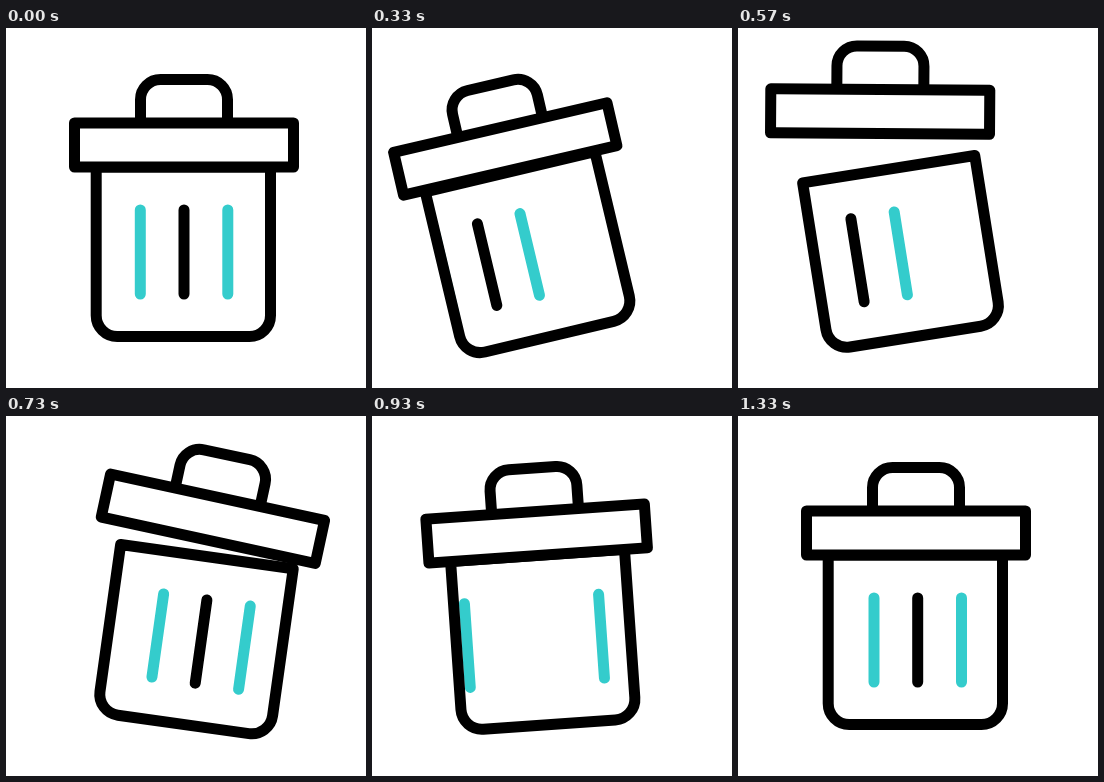
Recreate the animation shown at these times as an HTML page. Size 360 px wide and 360 px high, loop 2000 ms.

```html
<!DOCTYPE html>
<html lang="en">
<head>
<meta charset="utf-8">
<title>Trash can</title>
<style>
  html, body { margin: 0; width: 100%; height: 100%; overflow: hidden; background: #fff; }
  svg { display: block; width: 100%; height: 100%; }
  .ink { fill: none; stroke: #000; stroke-width: 11; stroke-linecap: round; stroke-linejoin: round; }
  .solid { fill: #fff; }
  .teal { stroke: #34cccc; }
</style>
</head>
<body>
<svg viewBox="0 0 360 360">
  <defs>
    <path id="bin" d="M90.200 139H264.500V287.500A21 21 0 0 1 243.500 308.500H111.200A21 21 0 0 1 90.200 287.500Z"/>
    <clipPath id="inside"><use href="#bin"/></clipPath>
    <g id="bars">
      <path class="teal" d="M136 182V266M223.500 182V266"/>
      <path d="M179.700 182V266"/>
    </g>
  </defs>
  <g id="can" class="ink">
    <g clip-path="url(#inside)">
      <g id="strip">
        <use href="#bars"/>
        <use href="#bars" x="222"/>
      </g>
    </g>
    <use href="#bin"/>
    <g id="lid">
      <path d="M134.500 95V71.500A20 20 0 0 1 154.500 51.500H201.500A20 20 0 0 1 221.500 71.500V95"/>
      <path class="solid" d="M68.500 95H287.500V139H68.500Z"/>
    </g>
  </g>
</svg>
<script>
  const LOOP = 2000, FPS = 30;

  // Keys are [frame, value], joined by sine easing.
  const tilt = [[2.3, 0], [13.75, -17.7], [22, 8], [28, -4], [34, 2.1], [40, 0]];
  const slide = [[0, -223.7], [14, -278.5], [40, 0]];
  const lift = [[9, 0], [17.3, 36.4], [26.1, 0]];

  const [can, strip, lid] = ['can', 'strip', 'lid'].map(id => document.getElementById(id));

  function valueAt(keys, f) {
    const next = keys.findIndex(key => key[0] > f);
    if (next === 0) return keys[0][1];
    if (next < 0) return keys[keys.length - 1][1];
    const [f0, v0] = keys[next - 1], [f1, v1] = keys[next];
    const eased = (1 - Math.cos(Math.PI * (f - f0) / (f1 - f0))) / 2;
    return v0 + (v1 - v0) * eased;
  }

  function draw() {
    // The motion is stepped at 30 frames per second; the offset absorbs timer rounding.
    const f = Math.floor((performance.now() % LOOP + 3.5) * FPS / 1000) % (LOOP * FPS / 1000);
    const up = valueAt(lift, f);
    can.setAttribute('transform', `rotate(${valueAt(tilt, f)} 178 308.5)`);
    strip.setAttribute('transform', `translate(${valueAt(slide, f)} 0)`);
    lid.setAttribute('transform', `translate(0 ${-up}) rotate(${up * 0.26} 178 117)`);
    requestAnimationFrame(draw);
  }
  draw();
</script>
</body>
</html>
```
